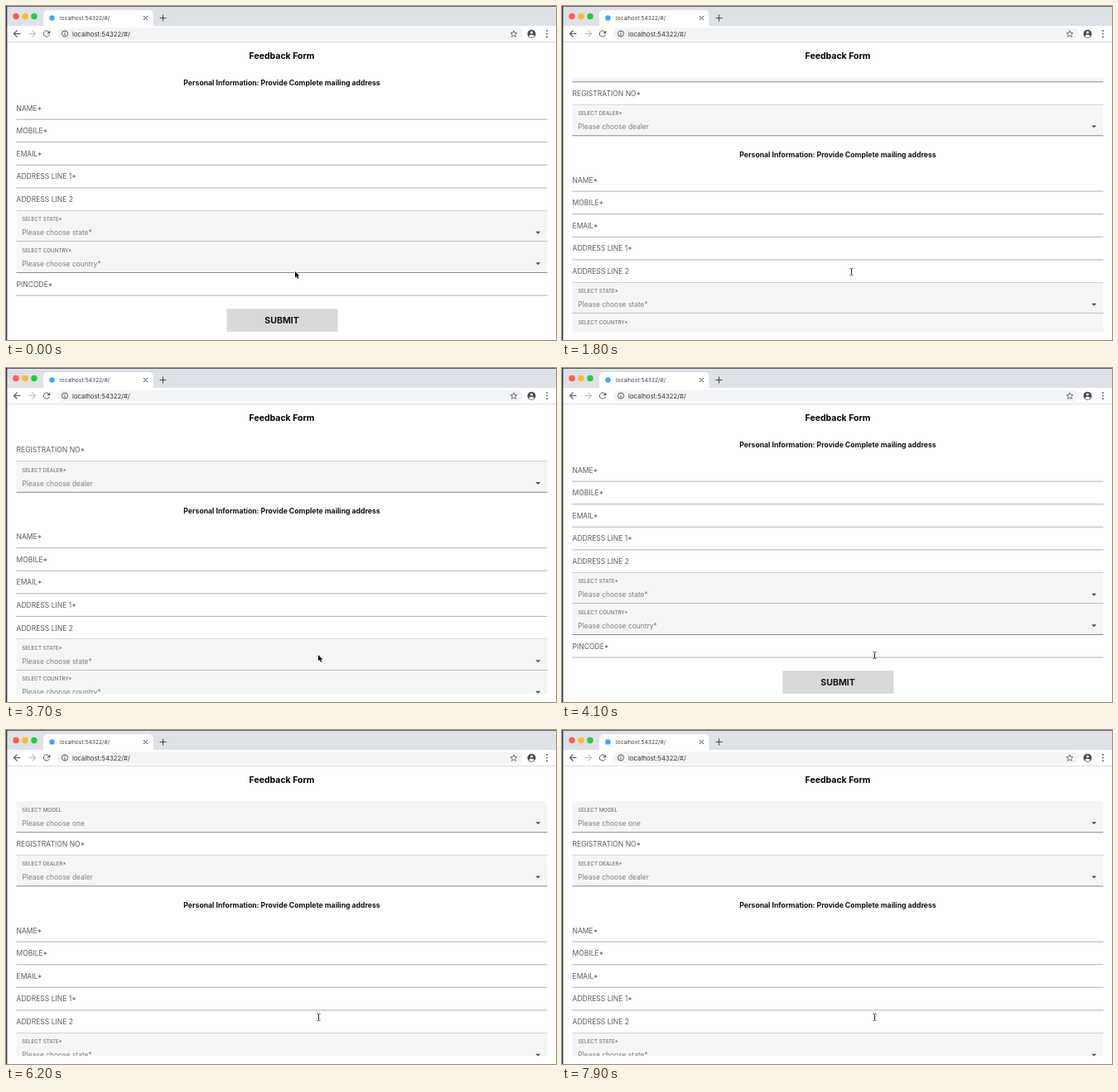
Animation of 664x404 px, one loop 8 s. Source, as an HTML page with a canvas:

```html
<!DOCTYPE html>
<html lang="en">
<head>
<meta charset="utf-8">
<title>Feedback Form</title>
<style>
html, body { margin: 0; width: 100%; height: 100%; overflow: hidden; background: #fff; }
canvas { display: block; width: 664px; height: 404px; }
</style>
</head>
<body>
<canvas id="stage" width="664" height="404"></canvas>
<script>
const ctx = document.getElementById('stage').getContext('2d');
const LOOP = 8000, STEP = 100;
const LEFT = 12.5, RIGHT = 653.5, CENTER = 333;
const VIEW = { top: 86, bottom: 394 };

// Each run: start time, then one scroll offset per step.
const scrollRuns = [
  [0, 119],
  [1100, 117, 114, 111.5],
  [1600, 96, 63, 32, 12, 3, 0],
  [3500, 4, 17, 38.5, 68, 95, 112, 119],
  [5100, 114.5, 92, 50, 14, 0],
  [6400, 14, 60, 105, 119],
  [7500, 80, 25, 0]
];
const pointerPath = [[0, 349, 321], [2600, 352, 325], [2700, 367, 339], [2800, 377, 347]];

const rows = [
  { kind: 'select', top: 86, height: 37.8, label: 'SELECT MODEL', hint: 'Please choose one' },
  { kind: 'text', top: 123.8, height: 27.6, label: 'REGISTRATION NO*' },
  { kind: 'select', top: 151.4, height: 37.4, label: 'SELECT DEALER*', hint: 'Please choose dealer' },
  ...['NAME*', 'MOBILE*', 'EMAIL*', 'ADDRESS LINE 1*', 'ADDRESS LINE 2'].map((label, i) =>
    ({ kind: 'text', top: 228.5 + i * 27.6, height: 27.6, label })),
  { kind: 'select', top: 366.5, height: 37.5, label: 'SELECT STATE*', hint: 'Please choose state*' },
  { kind: 'select', top: 404, height: 37.5, label: 'SELECT COUNTRY*', hint: 'Please choose country*' },
  { kind: 'text', top: 441.5, height: 27.6, label: 'PINCODE*' }
];

function text(str, x, y, size, color, weight = 400, align = 'left') {
  ctx.font = `${weight} ${size}px Inter, sans-serif`;
  ctx.fillStyle = color;
  ctx.textAlign = align;
  ctx.textBaseline = 'alphabetic';
  ctx.fillText(str, x, y + size * 0.364);
}

function rect(x, y, w, h, color) {
  ctx.fillStyle = color;
  ctx.fillRect(x, y, w, h);
}

function roundRect(x, y, w, h, radius, color) {
  ctx.fillStyle = color;
  ctx.beginPath();
  ctx.roundRect(x, y, w, h, radius);
  ctx.fill();
}

function disc(x, y, r, color) {
  ctx.fillStyle = color;
  ctx.beginPath();
  ctx.arc(x, y, r, 0, Math.PI * 2);
  ctx.fill();
}

function ring(x, y, r, color, from = 0, to = Math.PI * 2) {
  ctx.strokeStyle = color;
  ctx.lineWidth = 1;
  ctx.beginPath();
  ctx.arc(x, y, r, from, to);
  ctx.stroke();
}

function trace(points) {
  ctx.beginPath();
  points.forEach(([x, y]) => ctx.lineTo(x, y));
}

function line(points, color, width = 1) {
  trace(points);
  ctx.strokeStyle = color;
  ctx.lineWidth = width;
  ctx.stroke();
}

function polygon(points, color) {
  trace(points);
  ctx.closePath();
  ctx.fillStyle = color;
  ctx.fill();
}

function navArrow(x, dir, color) {
  const y = 33.5;
  line([[x - 4 * dir, y], [x + 4 * dir, y]], color, 1.1);
  line([[x, y - 4], [x + 4 * dir, y], [x, y + 4]], color, 1.1);
}

function drawTabs() {
  rect(0, 0, 664, 24, '#dee1e6');
  ['#fc5b57', '#fdbc2f', '#28c840'].forEach((color, i) => disc(12 + i * 11, 12.5, 3.7, color));
  roundRect(45, 5, 132.5, 20, [5, 5, 0, 0], '#fff');
  disc(55.5, 14.5, 3.2, '#42a5f5');
  text('localhost:54322/#/', 65, 14.5, 6.7, '#3c4043');
  line([[166, 12], [171, 17]], '#4a4d51');
  line([[171, 12], [166, 17]], '#4a4d51');
  line([[185.5, 14.5], [193.5, 14.5]], '#4a4d51', 1.1);
  line([[189.5, 10.5], [189.5, 18.5]], '#4a4d51', 1.1);
}

function drawToolbar() {
  const ink = '#54585d';
  rect(0, 24, 664, 19, '#fff');
  roundRect(62, 26.5, 562, 14, 7, '#f3f4f5');
  navArrow(13.5, -1, ink);
  navArrow(31.5, 1, '#bfc1c4');
  ring(49, 33.5, 3.5, ink, 0.3, Math.PI * 1.75);
  polygon([[53.2, 29.4], [53.2, 33.2], [49.4, 33.2]], ink);
  ring(71, 33.5, 3.6, ink);
  rect(70.5, 33, 1, 2.8, ink);
  rect(70.5, 31.2, 1, 1, ink);
  text('localhost:54322/#/', 80, 33.7, 7.75, '#303336');

  const star = Array.from({ length: 11 }, (_, i) => {
    const angle = i * Math.PI / 5 - Math.PI / 2, r = i % 2 ? 1.8 : 4.2;
    return [613 + r * Math.cos(angle), 34 + r * Math.sin(angle)];
  });
  line(star, ink, 0.8);

  disc(634.5, 33.7, 5, '#484c51');
  disc(634.5, 32, 1.6, '#fff');
  ctx.beginPath();
  ctx.ellipse(634.5, 36.2, 3, 1.5, 0, 0, Math.PI * 2);
  ctx.fill();
  [30, 33.6, 37.2].forEach(y => disc(653, y, 0.95, ink));
  rect(0, 43, 664, 1, '#dadce0');
}

function drawRow({ kind, top, height, label, hint }) {
  const bottom = top + height, width = RIGHT - LEFT;
  if (kind === 'text') {
    text(label, LEFT, top + 14, 8.55, '#5c5c5c');
    rect(LEFT, bottom - 0.5, width, 1, '#b0b0b0');
    return;
  }
  rect(LEFT, top, width, height, '#f5f5f5');
  text(label, 19.3, top + 10.4, 6.25, '#606060');
  text(hint, 19.3, top + 26.7, 8.45, '#808080');
  const y = top + 25.2;
  polygon([[639.3, y], [645.3, y], [642.3, y + 3]], '#505050');
  rect(LEFT, bottom - 0.5, width, 1, '#898989');
}

function drawForm(scroll) {
  ctx.save();
  ctx.beginPath();
  ctx.rect(0, VIEW.top, 664, VIEW.bottom - VIEW.top);
  ctx.clip();
  ctx.translate(0, -scroll);
  rows.forEach(drawRow);
  text('Personal Information: Provide Complete mailing address', CENTER, 211.5, 8.67, '#111', 700, 'center');
  roundRect(266.5, 485.3, 134, 27.7, 1, '#d9d9d9');
  text('SUBMIT', CENTER, 499.5, 10.6, '#151515', 700, 'center');
  ctx.restore();
}

function drawPointer(x, y, scroll) {
  const pageY = y + scroll;
  const over = rows.find(r => pageY >= r.top && pageY < r.top + r.height);
  if (over && over.kind === 'text') {
    const beam = [[-2, -4], [-0.8, -4], [0, -3.2], [0, 3.2], [-0.8, 4], [-2, 4]];
    [1, -1].forEach(side =>
      line(beam.map(([dx, dy]) => [x + 0.5 + dx * side, y + 0.5 + dy]), '#222', 0.9));
    return;
  }
  const arrow = [[0, 0], [0, 7.6], [1.8, 6], [3.1, 8.8], [4.4, 8.2], [3.1, 5.5], [5.4, 5.4]]
    .map(([dx, dy]) => [x + dx, y + dy]);
  line([...arrow, arrow[0]], '#fff', 1.4);
  polygon(arrow, '#000');
}

const latest = (list, t) => list.filter(([start]) => start <= t).pop();

function scrollAt(t) {
  const [start, ...offsets] = latest(scrollRuns, t);
  return offsets[Math.min(Math.floor((t - start) / STEP), offsets.length - 1)];
}

function draw(now) {
  const t = now % LOOP;
  const scroll = scrollAt(t);
  const [, x, y] = latest(pointerPath, t);
  rect(0, 0, 664, 404, '#fff');
  drawTabs();
  drawToolbar();
  text('Feedback Form', CENTER, 60.3, 10.5, '#000', 700, 'center');
  drawForm(scroll);
  rect(0, 0, 664, 1, '#59616b');
  rect(0, 0, 1.4, 404, '#343c48');
  drawPointer(x, y, scroll);
}

let began = null;
function tick(now) {
  began ??= now;
  draw(Math.max(0, now - began));
  requestAnimationFrame(tick);
}
draw(0);
requestAnimationFrame(tick);
</script>
</body>
</html>
```
